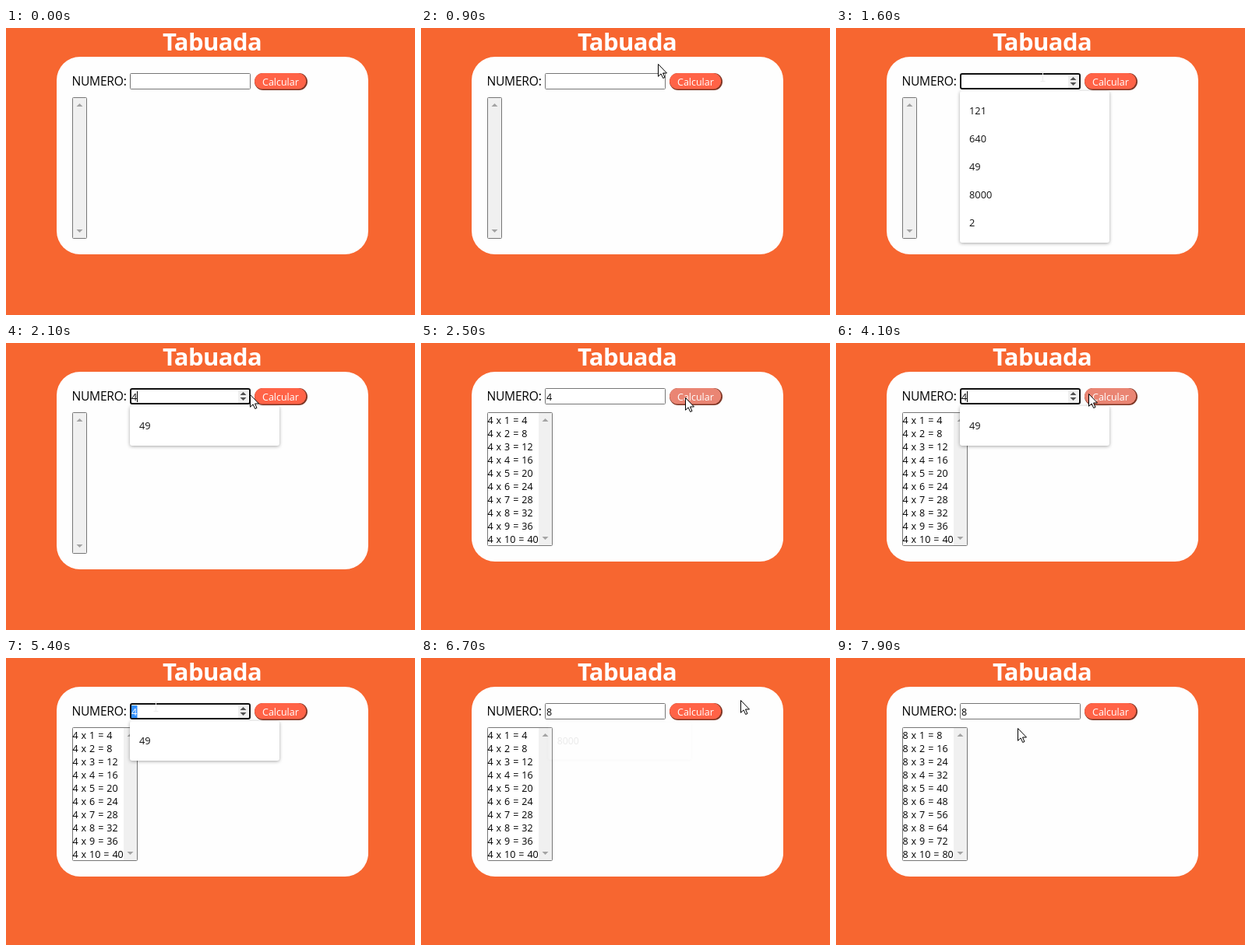
An HTML page that plays this animation: 525 by 369 pixels, repeating every 8 s.

```html
<!DOCTYPE html>
<html lang="pt">
<head>
<meta charset="utf-8">
<title>Tabuada</title>
<style>
html, body { margin: 0; height: 100%; overflow: hidden; background: #f76630; }
svg { display: block; width: 525px; height: 369px; font: 12.5px "Open Sans", "Noto Sans", sans-serif; }
.title { font-size: 31px; font-weight: 700; letter-spacing: -.6px; fill: #fff; text-anchor: middle; }
.label { font-size: 15.6px; letter-spacing: -.25px; }
.row { word-spacing: .7px; }
.button { fill: #fff; }
.option { font-size: 12.8px; font-weight: 500; fill: #111; }
.popup { filter: drop-shadow(0 1px 2px rgba(0, 0, 0, .35)); }
</style>
</head>
<body>
<svg id="stage" viewBox="0 0 525 369"></svg>
<script>
const LOOP = 8000, STEP = 100, ROWS = 10;
const stage = document.getElementById('stage');
const field = { x: 159, y: 58, w: 155, h: 21 };
const submit = { x: 319, y: 58, w: 68, h: 22 };
const label = { x: 85, y: 58, w: 70, h: 21 };
const history = [121, 640, 49, 8000, 2];

// When the user acts
const at = {
  focus: 1200, suggest: 1300, typeFirst: 1700, clickFirst: 2300,
  refocus: 3000, select: 4700, typeNext: 5600, blur: 6700, clickNext: 7400
};

// Pointer moves, each starting where the one before ended
const start = { x: 390, y: 13 };
const moves = [
  { from: 400, to: 1200, x: 265, y: 62 },
  { from: 1900, to: 2300, x: 362, y: 70 },
  { from: 2300, to: 2500, x: 340, y: 70 },
  { from: 2700, to: 3300, x: 97, y: 67 },
  { from: 3300, to: 3500, x: 288, y: 67 },
  { from: 3700, to: 4100, x: 325, y: 65 },
  { from: 4100, to: 4400, x: 83, y: 62 },
  { from: 4400, to: 4700, x: 166, y: 62 },
  { from: 4800, to: 5400, x: 192, y: 62 },
  { from: 5800, to: 6500, x: 411, y: 54 },
  { from: 6800, to: 7100, x: 345, y: 66 },
  { from: 7400, to: 7900, x: 234, y: 90 }
];

const between = (t, a, b) => t >= a && t < b;
const inside = (p, box) =>
  p && between(p.x, box.x, box.x + box.w) && between(p.y, box.y, box.y + box.h);
const ease = f => f * f * (3 - 2 * f);

const rect = (x, y, w, h, fill, more = '') =>
  `<rect x="${x}" y="${y}" width="${w}" height="${h}" fill="${fill}" ${more}/>`;
const frame = (x, y, w, h) =>
  rect(x + .5, y + .5, w - 1, h - 1, '#fff', 'stroke="#767676" rx="1"');
const text = (x, y, str, cls = '', more = '') =>
  `<text x="${x}" y="${y}" class="${cls}" ${more}>${str}</text>`;
// A negative height points the arrow down
const arrow = (x, y, h, fill) =>
  `<path d="M${x - 4} ${y + h / 2}h8l-4 ${-h}z" fill="${fill}"/>`;

function pointerAt(t) {
  if (t < moves[0].from) return null;
  let { x, y } = start;
  for (const m of moves) {
    const f = ease(Math.min(1, Math.max(0, (t - m.from) / (m.to - m.from))));
    x += (m.x - x) * f;
    y += (m.y - y) * f;
  }
  return { x: Math.round(x), y: Math.round(y) };
}

// Suggestions are past entries that begin with the typed value
function options(t, value) {
  const open = between(t, at.suggest, at.clickFirst + STEP) || between(t, at.refocus, at.blur + STEP);
  return open ? history.filter(n => n !== value && `${n}`.startsWith(value)) : [];
}

function list(n) {
  const w = n ? 84 : 19, h = n ? 17 * ROWS + 2 : 182, x = 85 + w - 18;
  let out = frame(85, 89, w, h) + rect(x, 90, 17, h - 2, '#f0f0f0')
    + arrow(x + 8.5, 99, 4, '#a3a3a3') + arrow(x + 8.5, 79 + h, -4, '#a3a3a3');
  for (let i = 1; n && i <= ROWS; i++)
    out += text(85.5, 87 + 17 * i, `${n} x ${i} = ${n * i}`, 'row');
  return out;
}

function input(value, focus, hover, selected) {
  const { x, y, w, h } = field;
  let out = focus
    ? rect(x + 1, y + 1, w - 2, h - 2, '#fff', 'stroke="#101010" stroke-width="2" rx="2"')
    : frame(x, y, w, h);
  if (selected) out += rect(161, 61, 7.5, 16, '#3390ff');
  out += text(161, 74, value, '', selected ? 'fill="#fff"' : '');
  if (focus && value && !selected) out += rect(168, 62, 1, 14, '#000');
  if (focus || hover)
    out += rect(298, 61, 13, 16, '#f0f0f0')
      + arrow(304.5, 65, 4, '#505050') + arrow(304.5, 72, -4, '#505050');
  return out;
}

function button(hover) {
  const { x, y, w, h } = submit;
  return rect(x, y, w, h, '#7d3524', 'rx="11"')
    + rect(x, y, w - 1.7, h - 1.5, hover ? '#ea8573' : '#ff6347', 'rx="10.2"')
    + text(329, 74, 'Calcular', 'button');
}

function popup(items, fading) {
  if (!items.length) return '';
  const look = fading ? 'opacity=".08" transform="translate(255 106) scale(.955) translate(-255 -106)"' : '';
  return `<g ${look}>` + rect(159, 81, 192, 15 + 36 * items.length, '#fff', 'rx="3" class="popup"')
    + items.map((v, i) => text(171, 111 + 36 * i, v, 'option')).join('') + '</g>';
}

function pointer(p, beam) {
  if (!p) return '';
  const shape = beam
    ? '<path d="M-2.5-5.5h6M-2.5 6.5h6M.5-5v11" stroke="#eee"/>'
    : '<path d="M-.5.5v15.8l3.6-3.4 2.6 5.6 2.3-1-2.5-5.5h5z" fill="#fff" stroke="#000"/>';
  return `<g transform="translate(${p.x} ${p.y})">${shape}</g>`;
}

function draw(t) {
  const p = pointerAt(t);
  const overField = inside(p, field);
  const focus = between(t, at.focus, at.clickFirst) || between(t, at.refocus, at.blur);
  const selected = between(t, at.select, at.typeNext);
  const value = t < at.typeFirst ? '' : t < at.typeNext ? 4 : 8;
  const factor = t < at.clickFirst ? 0 : t < at.clickNext ? 4 : 8;
  stage.innerHTML = rect(0, 0, 525, 369, '#f76630')
    + text(264.5, 28.5, 'Tabuada', 'title')
    + rect(65, 37, 400, factor ? 244 : 254, '#fefefe', 'rx="30"')
    + text(84.5, 74, 'NUMERO:', 'label')
    + list(factor)
    + popup(options(t, value), !focus)
    + input(value, focus, overField, selected)
    + button(inside(p, submit))
    + pointer(p, overField || inside(p, label));
}

let last = -1;
function tick() {
  const t = Math.floor(performance.now() % LOOP / STEP) * STEP;
  if (t !== last) draw(last = t);
  requestAnimationFrame(tick);
}
tick();
</script>
</body>
</html>
```
